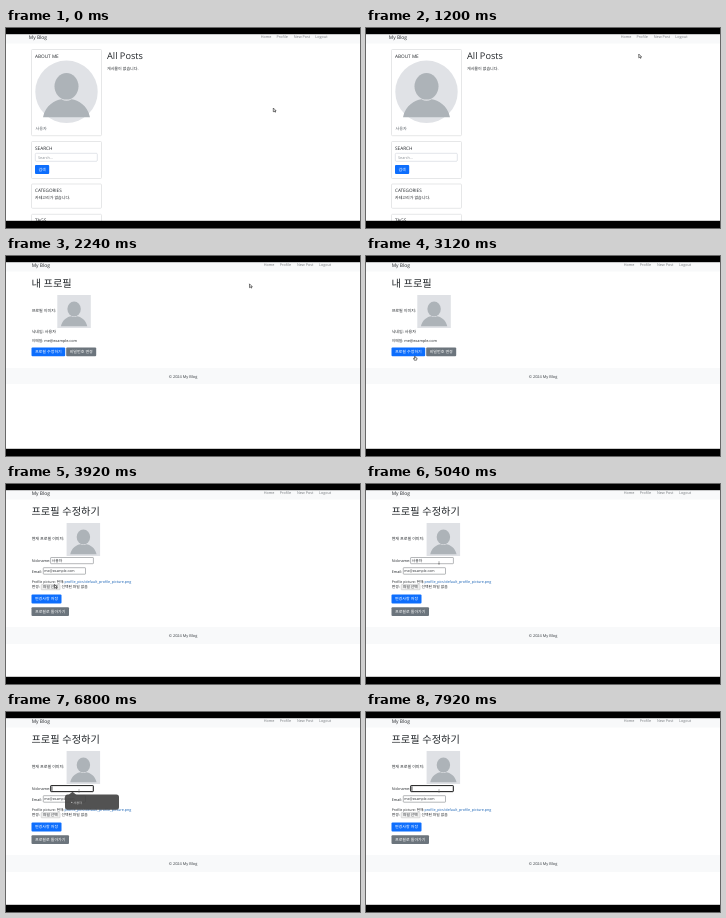
Animation of 354x200 px, one loop 8000 ms. Source, as an HTML page:

```html
<!DOCTYPE html>
<html lang="en">
<head>
<meta charset="utf-8">
<title>My Blog</title>
<style>
  html, body { margin: 0; width: 100%; height: 100%; overflow: hidden; background: #fff; }
  svg { display: block; width: 354px; height: 200px; }
  text { font-family: "Open Sans", "Noto Sans CJK KR", "Noto Sans CJK", sans-serif; fill: #212529; white-space: pre; text-rendering: geometricPrecision; }
</style>
</head>
<body>
<svg id="stage" viewBox="0 0 354 200"></svg>
<script>
const LOOP = 8000, STEP = 80;
const BLUE = '#0d6efd', GRAY = '#6c757d', PALE = '#f8f9fa';

const text = (x, y, size, str, fill = '#212529', extra = '') =>
  `<text x="${x}" y="${y}" font-size="${size}" style="fill:${fill}" ${extra}>${str}</text>`;
const box = (x, y, w, h, fill, extra = '') =>
  `<rect x="${x}" y="${y}" width="${w}" height="${h}" fill="${fill}" ${extra}/>`;
const field = (x, y, w, h, stroke, width = .6, r = .5) =>
  box(x, y, w, h, '#fff', `rx="${r}" stroke="${stroke}" stroke-width="${width}"`);
const card = (y, h) => field(25.5, y, 70, h, '#dcdddf', .7, 1);
const button = (x, y, w, h, fill, label) =>
  box(x, y, w, h, fill, 'rx="1"') +
  text(x + w / 2, y + h / 2 + 1.45, 4, label, '#fff', 'text-anchor="middle"');
const group = (id, body, attrs = '') => `<g id="${id}" ${attrs}>${body}</g>`;

// Head and shoulders, drawn around the head's centre
const person = (x, y, s) =>
  `<g transform="translate(${x} ${y}) scale(${s})" fill="#adb3b8">
    <ellipse rx="12" ry="13.3"/>
    <path d="M-23.5 31C-21 19-12 14-5 13Q0 16 5 13C12 14 21 19 23.5 31Z"/></g>`;
const portrait = x => box(x, 39, 33.5, 33, '#dfe1e5') + person(x + 16.8, 53, .56);

const navbar = (brandX, links) =>
  box(0, 6, 354, 9.5, PALE) + text(brandX, 11, 4.9, 'My Blog') +
  ['Home', 'Profile', 'New Post', 'Logout'].map((s, i) => text(links[i], 10.4, 3.75, s, '#777b7f')).join('');
const footer = (y, h) =>
  box(0, y, 354, h, PALE) + text(177, y + h / 2 + 1.6, 3.9, '© 2024 My Blog', '#33383d', 'text-anchor="middle"');

const home =
  navbar(22.8, [254.8, 270.5, 287.8, 309.3]) +
  group('hover', box(269, 6, 15, 7.3, BLUE, 'rx=".8"') + text(270.5, 10.4, 3.75, 'Profile', '#4b91fa')) +
  text(101, 31, 9.2, 'All Posts') + text(101, 42.3, 4, '게시물이 없습니다.') +
  card(21.5, 86.2) + text(29, 30, 4.7, 'ABOUT ME') +
  '<circle cx="60.5" cy="63.8" r="31.2" fill="#e0e2e6"/>' + person(60.5, 58.3, 1) +
  text(29.5, 101.6, 4.1, '사용자', '#5f666d') +
  card(113.5, 37) + text(29, 122, 4.7, 'SEARCH') +
  field(29.3, 125.3, 62, 8, '#ced4da', .6, 1) + text(32, 130.6, 3.8, 'Search...', '#8a9096') +
  button(29, 137, 14.2, 9, BLUE, '검색') +
  card(156, 24.3) + text(29, 164.4, 4.6, 'CATEGORIES') + text(29, 171.3, 4, '카테고리가 없습니다.') +
  card(186.3, 20) + text(29, 194.3, 4.8, 'TAGS');

const innerNav = navbar(25.7, [257.8, 273.8, 291, 313]);

const profile = innerNav + text(25.5, 30.8, 10.2, '내 프로필') +
  text(25.7, 56.4, 4, '프로필 이미지:') + portrait(51.3) +
  text(25.7, 77.3, 4, '닉네임: 사용자') + text(25.7, 86.4, 3.8, '이메일: me@example.com') +
  button(25.5, 91.6, 33.7, 8.7, BLUE, '프로필 수정하기') +
  button(60.2, 91.6, 30, 8.7, GRAY, '비밀번호 변경') + footer(112, 16);

const edit = innerNav + text(25.5, 30.8, 10.2, '프로필 수정하기') +
  text(25.7, 56.4, 4, '현재 프로필 이미지:') + portrait(60.6) +
  text(25.7, 78.2, 3.75, 'Nickname:') + field(44.6, 73.5, 42.8, 6.2, '#85888b') +
  group('focus', '<rect x="44.7" y="73.6" width="42.6" height="6" rx=".6" fill="none" stroke="#101010" stroke-width=".9"/>') +
  '<text id="nick" x="45.8" y="78" font-size="3.8"></text>' +
  group('caret', box(0, 74.4, .6, 4.4, '#000')) +
  text(25.7, 88.6, 3.75, 'Email:') + field(37.3, 83.7, 42.2, 6.5, '#85888b') +
  text(38.3, 88, 3.5, 'me@example.com') +
  text(25.7, 98.6, 3.55, 'Profile picture: 현재:') +
  text(58.4, 98.6, 3.7, 'profile_pics/default_profile_picture.png', '#1762b5') +
  text(25.7, 104.4, 3.8, '변경:') + box(35.2, 100.6, 18.8, 5.2, '#efefef', 'rx=".6" stroke="#b0b0b0" stroke-width=".4"') +
  text(37, 104.4, 3.7, '파일 선택') + text(55.4, 104.4, 3.8, '선택된 파일 없음') +
  button(25.5, 110.6, 30, 8.8, BLUE, '변경사항 저장') +
  button(25.5, 123.2, 37.5, 8.8, GRAY, '프로필로 돌아가기') + footer(143, 17) +
  group('tip', '<path d="M62.5 83L66.5 79.8L70.5 83Z" fill="#444"/>' + box(59, 82.5, 54, 15.2, '#444', 'rx="2.6"') +
    '<circle cx="65.8" cy="90.3" r=".6" fill="#ddd"/>' + text(67.3, 91.5, 3.1, '사용자', '#ddd'));

const outline = 'fill="#fff" stroke="#111" stroke-width=".55" stroke-linejoin="round"';
const cursors = {
  arrow: `<path d="M0 0V3.8L1 3L1.7 4.3L2.3 4L1.7 2.8H2.8Z" ${outline}/>`,
  hand: `<path d="M0 0V2.2L-1 1.8L-.2 3.7H2L2.6 1.6L.8 1.2V0Z" ${outline}/>`,
  beam: '<path d="M-1 2H1M0 2V-.8" fill="none" stroke="#555" stroke-width=".5"/>'
};

const $ = id => document.getElementById(id);
$('stage').innerHTML = box(0, 0, 354, 200, '#fff') +
  group('home', home) + group('profile', profile) + group('edit', edit) +
  group('pointer', Object.entries(cursors).map(([id, body]) => group(id, body)).join('')) +
  box(0, 0, 354, 6.2, '#000') + box(0, 192.8, 354, 7.2, '#000');

// Pointer stops: time, x, y
const path = [[0, 267.3, 80], [560, 267.3, 80], [1440, 274, 14], [1600, 274.5, 13], [2080, 274.5, 13],
  [2720, 76, 108], [3040, 48.5, 100.5], [4240, 48.5, 100.5], [4880, 73, 78], [LOOP, 73, 78]];
// Nickname contents over time
const typing = [[0, '사용자'], [6320, '사용'], [6480, '사'], [6800, ''], [7120, 'd'], [7280, 'dk'],
  [7440, 'dks'], [7600, 'dk'], [7760, 'd'], [7920, '']];

const within = (t, a, b) => t >= a && t < b;
const show = (id, on) => $(id).setAttribute('display', on ? 'inline' : 'none');
const ramp = (t, a, b) => Math.min(1, Math.max(0, (t - a) / (b - a)));

function pointerAt(t) {
  const i = path.findIndex(p => p[0] > t), [a, ax, ay] = path[i - 1], [b, bx, by] = path[i];
  const u = ramp(t, a, b), k = u * u * (3 - 2 * u);
  return [ax + (bx - ax) * k, ay + (by - ay) * k];
}

function draw(now) {
  const t = Math.floor(now % LOOP / STEP) * STEP;
  show('home', t < 2080);
  show('profile', within(t, 2080, 3840));
  show('edit', t >= 3840);
  show('hover', t >= 1520);

  const hand = within(t, 1520, 2160) || within(t, 2960, 3840), beam = t >= 4800;
  show('hand', hand);
  show('beam', beam);
  show('arrow', !hand && !beam);
  $('pointer').setAttribute('transform', `translate(${pointerAt(t)})`);

  const nick = typing.filter(([at]) => at <= t).pop()[1];
  const charWidth = nick > 'z' ? 3.5 : 2.2;
  $('nick').textContent = nick;
  show('focus', t >= 5520);
  show('caret', within(t, 5520, 6000) || t >= 6320);
  $('caret').setAttribute('transform', `translate(${45.7 + nick.length * charWidth} 0)`);
  $('tip').setAttribute('opacity', .92 * ramp(t, 6240, 6560) * (1 - ramp(t, 6800, 7120)));
}

const start = performance.now();
(function tick() {
  draw(performance.now() - start);
  requestAnimationFrame(tick);
})();
</script>
</body>
</html>
```
